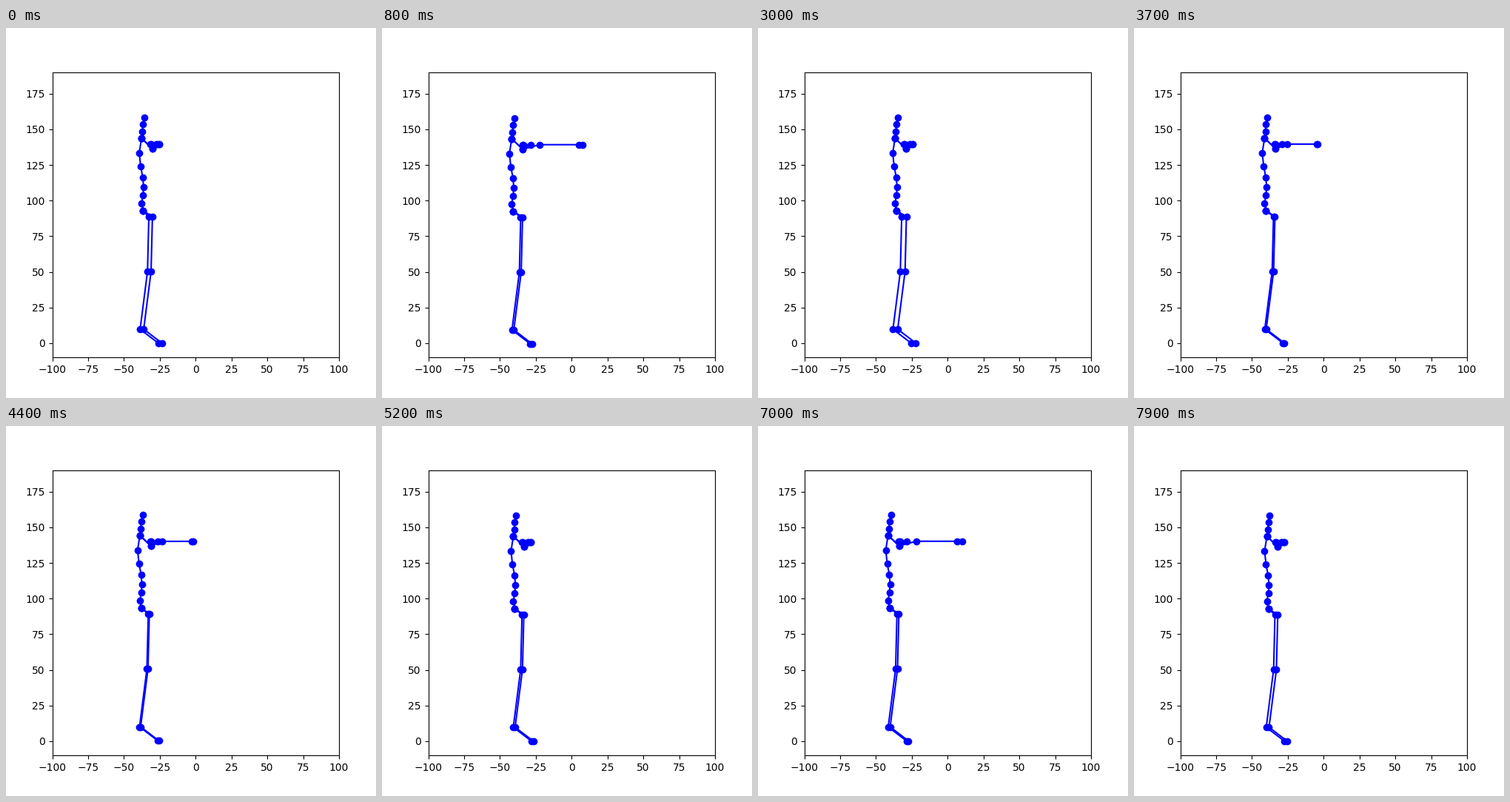
Recreate the animation shown at these times as a matplotlib script. Size 500 by 500 pixels, loop 8 s.

```python
import numpy as np
import matplotlib.pyplot as plt
from matplotlib.animation import FuncAnimation

FRAMES, STEP = 80, 100

# Rest pose seen from the side: head to hips, hip to toe, shoulder to hand
SPINE = np.array([
    (-35.75, 158.3), (-36.7, 153.6), (-37.1, 148.4), (-37.7, 143.8),
    (-39.3, 133.4), (-38.3, 124.0), (-36.8, 116.2), (-36.25, 109.5),
    (-36.7, 103.8), (-37.7, 98.1), (-36.7, 92.9)])
LEG = np.array([(-32.6, 88.7), (-33.55, 50.2), (-38.7, 9.7), (-25.95, -.1)])
SHOULDER, ARM_Y = (-30.05, 136.4), 139.6
NECK = SPINE[3]

# Motions as smooth pulses: (centre s, half width s, strength)
BEND = [(1.02, .92, 1.04), (4.05, .74, .94), (6.95, .72, 1.06)]
SWAY = [(.9, .95, -4.2), (2.7, 1.3, 1.2), (3.65, .7, -3.7),
        (4.95, .9, -3.6), (7.25, 1.2, -4.3)]
TURN = [(2.6, 1.4, .6), (4.4, 1.2, -1.4)]
LIFT = [(.7, .4, -.4), (1.45, .6, .8), (4.4, .9, .6), (7.1, .8, .7)]
DROP = [(1.25, .6, -1.9), (7.4, .5, -1.3)]


def hump(u):
    """Raised cosine: 1 at u = 0, falling to 0 at |u| = 1."""
    return .5 + .5 * np.cos(np.pi * min(abs(u), 1))


def pulses(parts, t, shape=lambda h: h):
    return sum(k * shape(hump((t - c) / w)) for c, w, k in parts)


def arm(elbow, wrist, hand):
    xs = (elbow, wrist, hand)
    return np.array([NECK, SHOULDER] + [(x, ARM_Y) for x in xs])


def pose(t):
    sway, turn, lift, drop = (pulses(p, t) for p in (SWAY, TURN, LIFT, DROP))
    bend = pulses(BEND, t, lambda h: np.sin(np.pi / 2 * h))

    wrist = -25.4 + 34 * bend
    near = arm(-27 + 8.5 * bend ** 1.5, wrist, wrist + 2.6 * bend ** 4)
    far = arm(-27.5 + 2.9 * bend, -31.6 + 1.4 * bend, -31.2 + 1.6 * bend)
    upper = [part + (sway, lift) for part in (SPINE, near, far)]

    gap = .3 * sway + turn
    foot = .5 * lift + drop
    rise = np.array([lift, (lift + foot) / 2, foot, foot])
    legs = []
    for offset, share in ((0, -.3), (2.5, .7)):
        shift = np.full(4, offset + .8 * sway + share * gap)
        leg = LEG + np.column_stack([shift, rise])
        legs.append(np.vstack([upper[0][-1], leg]))
    return upper + legs


fig, ax = plt.subplots(figsize=(5, 5), dpi=100)
ax.set(xlim=(-100, 100), ylim=(-10, 190),
       xticks=range(-100, 101, 25), yticks=range(0, 176, 25))
lines = [ax.plot([], [], "bo-")[0] for _ in range(5)]


def draw(i):
    for line, pts in zip(lines, pose(i * STEP / 1000)):
        line.set_data(*pts.T)
    return lines


anim = FuncAnimation(fig, draw, frames=FRAMES, interval=STEP,
                     repeat=True, repeat_delay=0)
plt.show()
```
